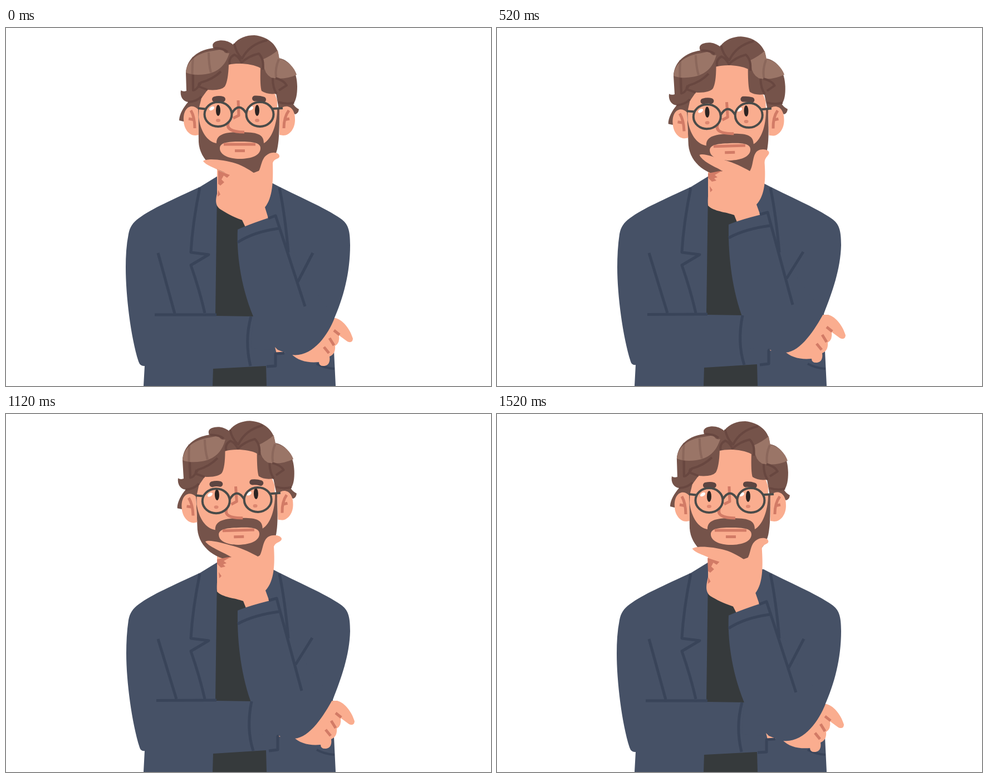
Animation, 871 px wide and 643 px high, one loop 1.56 s. Source, as an HTML page with a canvas:

```html
<!DOCTYPE html>
<html lang="en">
<head>
<meta charset="utf-8">
<title>Thinking man</title>
<style>
html, body { margin: 0; width: 100%; height: 100%; overflow: hidden; background: #fff; }
canvas { display: block; width: 871px; height: 643px; }
</style>
</head>
<body>
<canvas id="stage" width="871" height="643"></canvas>
<script>
const ctx = document.getElementById('stage').getContext('2d');
const LOOP = 1560, STEP = 40;
const SKIN = '#faad8f', BLUSH = '#d27b66', HAIR = '#75534a', STRAND = '#684740',
  SHINE = '#9a7567', BROW = '#5d4541', FRAME = '#4a4b49', EYE = '#2d2422',
  COAT = '#465166', SEAM = '#394459', SHIRT = '#363a3c';

const clamp = v => Math.min(1, Math.max(0, v));
const swing = (t, from, to) => 0.5 - 0.5 * Math.cos(Math.PI * clamp((t - from) / (to - from)));

// Blends two paths that share the same commands.
function mix(a, b, k) {
  const ends = b.match(/-?[\d.]+/g);
  let i = 0;
  return a.replace(/-?[\d.]+/g, n => (+n + (ends[i++] - n) * k).toFixed(2));
}

function fill(path, color) {
  ctx.fillStyle = color;
  ctx.fill(new Path2D(path));
}

function line(path, color, width, cap = 'butt') {
  ctx.strokeStyle = color;
  ctx.lineWidth = width;
  ctx.lineCap = cap;
  ctx.lineJoin = 'round';
  ctx.stroke(new Path2D(path));
}

function oval(x, y, rx, ry, color, angle = 0) {
  ctx.fillStyle = color;
  ctx.beginPath();
  ctx.ellipse(x, y, rx, ry, angle, 0, Math.PI * 2);
  ctx.fill();
}

function turned(x, y, angle, paint) {
  ctx.save();
  ctx.translate(x, y);
  ctx.rotate(angle);
  ctx.translate(-x, -y);
  paint();
  ctx.restore();
}

function pose(t) {
  const back = t > 1120;
  const rest = swing(t, 1120, 1560);
  const lean = back ? 1 - rest : 1 - Math.pow(1 - clamp(t / 560), 2.6);
  return {
    lean,
    dip: 3 * (swing(t, 0, 280) - swing(t, 500, 740)),
    look: back ? 1 - rest : swing(t, 400, 760),
    pinch: swing(t, 320, 740) - swing(t, 740, 1120),
    tilt: back ? -0.033 * rest : 0
  };
}

function drawTorso(lean) {
  fill(mix(
    'M380 266L349 285C300 308 262 324 238 342C228 349 222 358 220 370C216 390 215 410 215 430C215 480 224 555 238 599Q241 608 249 607L247 643L592 643L589 580L588 525C606 485 618 440 618 390C618 362 614 352 602 343C572 322 525 303 479 279Z',
    'M380 266L349 285C300 308 262 324 238 342C228 349 222 358 220 370C217 390 216 410 216 430C216 480 226 555 240 599Q242 606 249 605L247 643L592 643L589 580L587 513C602 475 617 433 618 390C618 362 614 352 602 343C572 322 525 303 479 279Z',
    lean), COAT);
  fill(mix('M379 290L376 517L446 518L450 340L440 300Z',
    'M379 290L376 515L441 516L450 340L440 300Z', lean), SHIRT);
  fill(mix('M372 612L467 607L468 643L371 643Z', 'M372 610L467 604L468 643L371 643Z', lean), SHIRT);
  fill('M379 240L470 240L470 290L430 310L379 316Z', SKIN);
}

function drawHair() {
  fill('M311 166C311 155 319 142 327 133C318 132 312 123 314 112Q318 115 324 113L323 80C325 54 346 39 372 36Q369 27 377 24C388 20 400 23 408 30C418 17 432 13 446 13C471 15 490 32 490 54C512 58 523 80 523 105C523 120 521 129 516 137Q520 143 526 146Q525 154 519 155L508 146L491 152L485 118Q469 120 459 113Q456 105 457 72C443 64 415 62 400 66Q399 95 393 105Q386 113 362 111L351 126L345 150L330 155L319 168Z', HAIR);
  fill('M323 80C325 58 345 44 372 41L389 38Q392 47 401 45C394 68 380 80 358 83Q337 86 323 80Z', SHINE);
  fill('M460 57Q478 49 488 40L491 55C507 59 518 71 522 84Q500 94 476 89Q464 82 463 66Z', SHINE);
  ctx.globalAlpha = 0.3;
  line('M336 52Q333 80 336 112M364 44Q364 65 368 80M490 56Q483 72 485 88', STRAND, 4);
  ctx.globalAlpha = 1;
  line('M336 84V112Q342 112 350 98Q372 92 386 78M348 98Q345 103 346 105L362 111', STRAND, 4);
  line('M410 28Q413 45 424 55Q437 29 469 22M374 36Q390 36 398 43M402 65Q399 54 410 48Q417 50 423 62Q436 50 454 46Q464 56 461 75', STRAND, 4);
  line('M479 90Q479 108 486 118M484 90Q499 94 504 103L490 112M517 134Q505 138 489 133M327 133Q343 132 351 123', STRAND, 4);
}

function drawFace(look) {
  fill('M345 145L346 205C348 238 378 263 420 264C455 263 480 245 487 218C490 203 491 190 491 145Z', HAIR);
  fill('M347 130L395 58L462 58L487 130L487 150C485 182 474 201 463 207C463 190 450 187 420 187C390 187 378 192 378 207C361 204 349 185 346 160Z', SKIN);
  drawHair();
  fill('M345 146C333 134 318 143 319 165C319 180 328 193 340 193L346 192Z', SKIN);
  fill('M491 146C505 134 520 143 519 165C519 180 510 193 498 193L491 192Z', SKIN);
  line('M332 148Q339 160 339 180M328 163L339 165M508 148Q499 160 499 180M499 165L509 163', BLUSH, 5);
  fill('M384 216C384 206 397 204 420 204C444 204 457 206 457 216C457 229 440 235 420 235C400 235 384 228 384 216Z', SKIN);
  line('M391 209H448M411 220.5H429', BLUSH, 5);
  line('M417 130L418 157L408 162M400 169C394 181 406 187 428 187', BLUSH, 5);

  const lift = 3.2 * look;
  line(`M375 ${128 - lift}Q383 ${126 - lift} 389 ${128 - lift}`, BROW, 10, 'round');
  line(`M447 ${126.5 - lift}Q455 ${126 - lift} 462 ${128.5 - lift}`, BROW, 10, 'round');
  for (const x of [381, 451]) {
    oval(x, 166, 4, 3, '#dc8770');
    oval(x + 2 * look, 148 - 4 * look, 4, 10, EYE);
    oval(x - 11.5 + look, 144.5 - look, 5, 3, '#fff', -0.55);
  }
  line('M356.5 155a24.5 22 0 1 0 49 0a24.5 22 0 1 0 -49 0M431.5 155a24.5 22 0 1 0 49 0a24.5 22 0 1 0 -49 0M405 154Q418.5 131 432 154M345 144L358 145.5M479 145L497 144', FRAME, 4);
}

function drawHead({ lean, dip, look }) {
  ctx.save();
  ctx.translate(0, dip);
  turned(418, 278, -0.0305 * lean, () => drawFace(look));
  ctx.restore();
}

function drawRestingHand(lean) {
  line('M558 603Q572 611 590 612', SEAM, 4);
  ctx.save();
  ctx.translate(3 * lean, -6 * lean);
  fill('M570 521L592 521C606 525 618 541 623 558Q622 567 613 563L598 552Q600 566 591 571Q592 586 581 590Q583 605 572 607Q562 608 562 600C543 602 524 598 512 585L540 550Z', SKIN);
  line('M589 543L599 551M581 557L589 570M571 573L580 584', BLUSH, 5);
  ctx.restore();
}

function drawChinHand({ lean, pinch, tilt }) {
  const open = 'M358 229C366 225 388 232 408 237C426 242 442 250 454 257C462 247 460 226 472 220C482 215 496 219 495 225C493 231 485 229 481 238C483 270 482 300 466 317L475 342L434 356L426 336C410 330 390 330 379 319C378 305 380 295 380 285L379 262L405 257C385 246 364 238 358 229Z';
  const low = 'M354 239C362 233 392 237 412 243C428 248 440 257 449 263C460 255 456 235 470 227C479 221 492 224 491 231C490 236 481 234 479 243C480 275 479 305 465 322L473 348L432 362L424 345C405 338 395 332 384 325C372 315 379 300 382 285L382 258L402 264C385 255 360 248 354 239Z';
  const closed = 'M370 227C375 223 390 232 408 237C426 242 442 250 454 257C460 247 456 228 464 221C472 216 483 219 481 225C480 230 476 236 480 246C482 270 482 300 466 317L475 342L434 356L426 336C410 330 390 330 379 319C378 305 380 295 380 285L379 262L406 257C390 249 373 240 370 227Z';
  turned(450, 345, tilt, () => {
    fill(mix(mix(low, open, lean), closed, pinch), SKIN);
    fill(mix('M381 256L402 264L397 269L391 265L387 272L392 277L385 283L381 280Z',
      'M379 261L405 256L391 264L396 268L390 270L394 274L386 276L379 269Z', lean), BLUSH);
    fill(mix('M381 291L385 299L380 303Z', 'M382 284L387 291L383 295Z', lean), BLUSH);
  });
}

function drawArm(lean) {
  fill(mix(
    'M416 362Q440 351 484 337L540 450L590 521C578 552 550 592 513 587L487 579L440 575L444 518C420 460 414 400 416 362Z',
    'M416 353Q440 343 487 332L540 450L587 512C571 541 546 581 518 583L490 577L440 575L439 515C420 460 415 400 416 353Z',
    lean), COAT);
  fill(mix('M483 573L488 578L501 583L486 585Z', 'M489 577L490 578L493 579L490 580Z', lean), SKIN);
  const seams = [
    ['M471 342L484 337L489 352L537 500', 'M472 335L486 331L490 346L531 497'],
    ['M551 404L524 456', 'M550 402L520 450'],
    ['M416 385Q445 366 490 360', 'M416 377Q445 361 490 355'],
    ['M267 515L378 515', 'M270 514.5L378 514'],
    ['M440 518Q428 562 439 607', 'M441 516Q431 565 444 605'],
    ['M500 584L484 585L484 607L468 608', 'M490 578L488 579L488 603L472 605'],
    ['M273 404L303 513', 'M273 404L306 512']
  ];
  for (const [a, b] of seams) line(mix(a, b, lean), SEAM, 5);
  line('M348 287Q335 350 332 403L364 407L332 426Q348 472 357 512M491 287Q501 335 507 403', SEAM, 5);
}

function draw(t) {
  const p = pose(t);
  ctx.fillStyle = '#fff';
  ctx.fillRect(0, 0, 871, 643);
  drawTorso(p.lean);
  drawHead(p);
  drawRestingHand(p.lean);
  drawChinHand(p);
  drawArm(p.lean);
}

const start = performance.now();
function tick() {
  const t = (performance.now() - start) % LOOP;
  draw(Math.floor(t / STEP) * STEP);
  requestAnimationFrame(tick);
}
tick();
</script>
</body>
</html>
```
